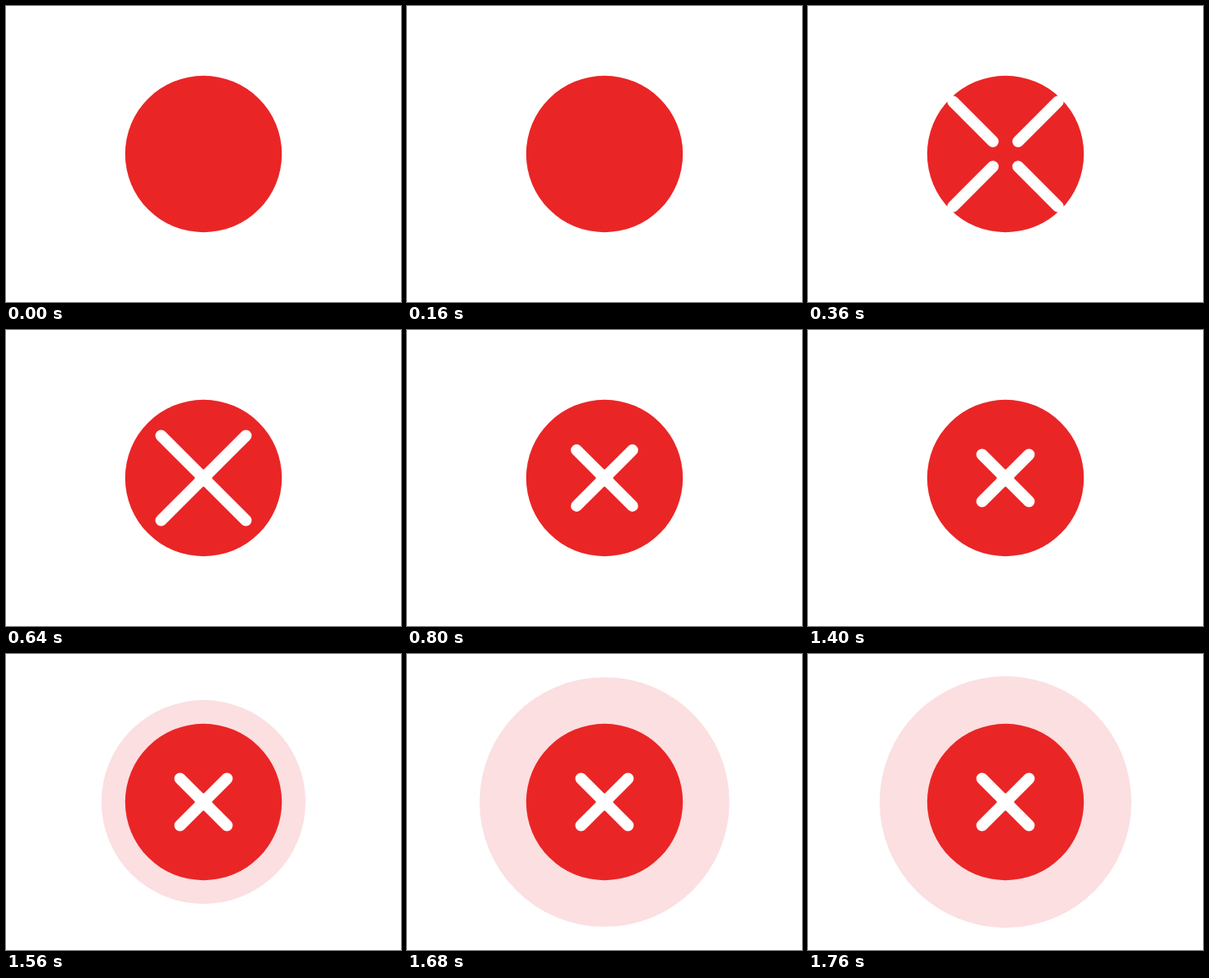
An HTML page that plays this animation: 480 px wide and 360 px high, repeating every 2400 ms.

```html
<!DOCTYPE html>
<html lang="en">
<head>
<meta charset="utf-8">
<title>Error mark</title>
<style>
  html, body { margin: 0; width: 100%; height: 100%; overflow: hidden; background: #fff; }
  svg { display: block; width: 100%; height: 100%; }
</style>
</head>
<body>
<svg viewBox="-240 -180 480 360">
  <circle id="halo" fill="#fbdfe1"/>
  <circle r="95.2" fill="#ea2526"/>
  <path id="cross" fill="none" stroke="#fff" stroke-width="14" stroke-linecap="round"/>
  <rect id="hub" x="-10.4" y="-10.4" width="20.8" height="20.8" fill="#fff"/>
</svg>
<script>
  const LOOP = 2400, STEP = 40;
  const ARM = 48.4;
  const halo = document.getElementById('halo');
  const cross = document.getElementById('cross');
  const hub = document.getElementById('hub');

  const ease = p => p < 0.5 ? 0.5 * (2 * p) ** 3.5 : 1 - 0.5 * (2 - 2 * p) ** 3.5;

  function tween(time, start, end, from, to) {
    const p = Math.min(1, Math.max(0, (time - start) / (end - start)));
    return from + (to - from) * ease(p);
  }

  // Four diagonal arms, each spanning two offsets from the centre.
  function armsPath(inner, outer) {
    return [[1, 1], [1, -1], [-1, -1], [-1, 1]]
      .map(([x, y]) => `M${x * inner} ${y * inner}L${x * outer} ${y * outer}`)
      .join('');
  }

  function draw(now) {
    const time = Math.floor((now % LOOP) / STEP) * STEP;
    const joined = time >= 560;
    const slide = tween(time, 0, 560, 79.6, 3.6);
    const inner = joined ? 0 : slide;
    const outer = joined ? tween(time, 560, 960, 52, 28.5) : slide + ARM;

    cross.setAttribute('d', armsPath(inner, outer));
    hub.style.visibility = joined ? 'visible' : 'hidden';
    halo.setAttribute('r', tween(time, 1360, 1760, 95, 153));
    requestAnimationFrame(draw);
  }

  draw(performance.now());
</script>
</body>
</html>
```
